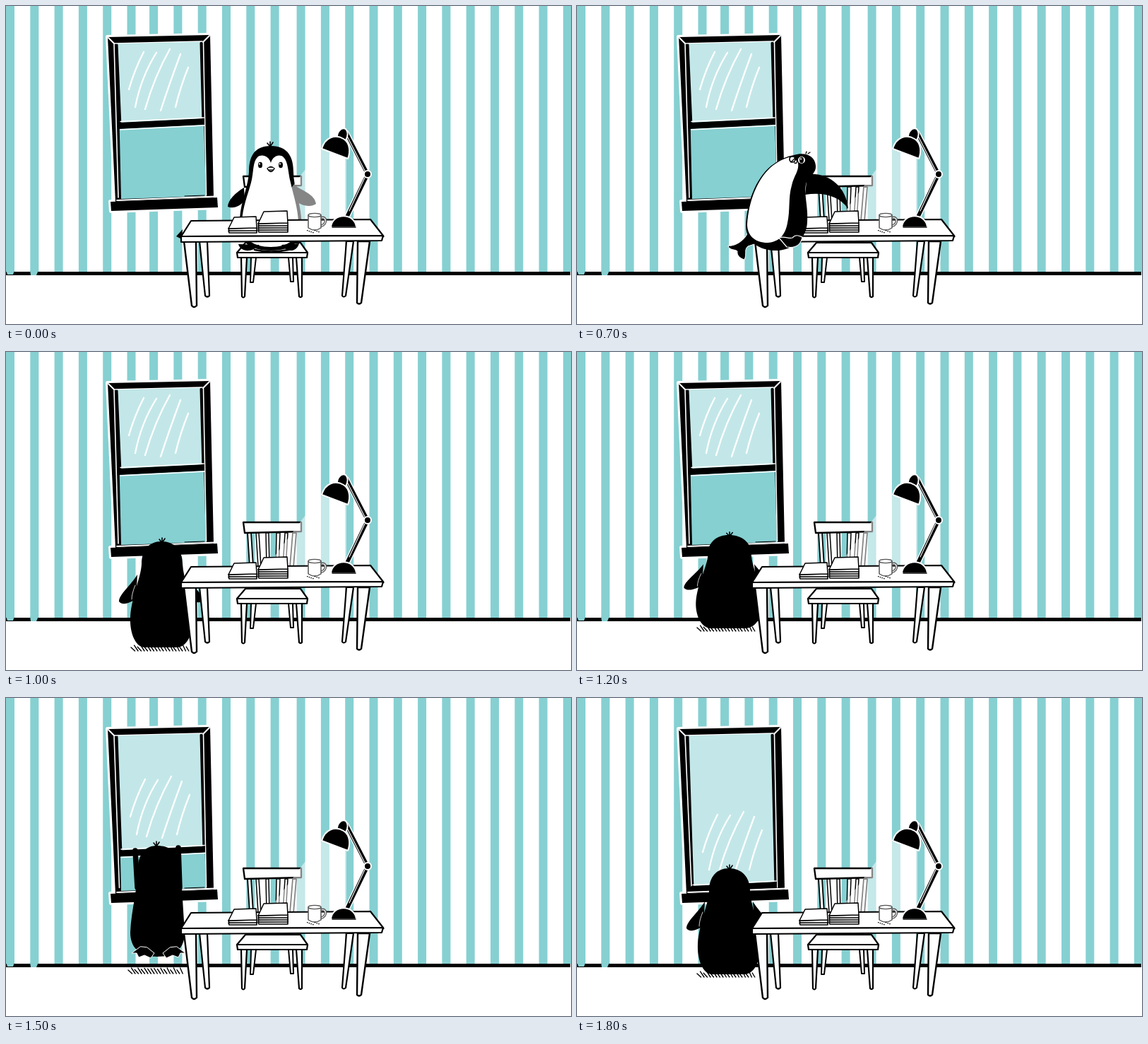
An HTML page with a canvas that plays this animation: 800x450 px, repeating every 2.3 s.

```html
<!DOCTYPE html>
<html lang="en">
<head>
<meta charset="utf-8">
<title>Penguin at the window</title>
<style>
html, body { margin: 0; width: 100%; height: 100%; overflow: hidden; background: #fff; }
canvas { display: block; width: 800px; height: 450px; }
</style>
</head>
<body>
<canvas id="stage" width="800" height="450"></canvas>
<script>
const ctx = document.getElementById('stage').getContext('2d');
const TEAL = '#86d0d2', GLASS = '#c3e7e8', INK = '#000', PAPER = '#fff';
const LOOP = 2300;
ctx.lineJoin = ctx.lineCap = 'round';

function shape(d, fill, stroke, width = 2) {
  const p = new Path2D(d);
  if (fill) { ctx.fillStyle = fill; ctx.fill(p); }
  if (stroke) { ctx.strokeStyle = stroke; ctx.lineWidth = width; ctx.stroke(p); }
}
const line = (d, width = 2, color = INK) => shape(d, null, color, width);
const box = (d, width = 2) => shape(d, PAPER, INK, width);

function oval(x, y, rx, ry, fill, stroke, width = 1.5) {
  ctx.beginPath();
  ctx.ellipse(x, y, rx, ry, 0, 0, Math.PI * 2);
  if (fill) { ctx.fillStyle = fill; ctx.fill(); }
  if (stroke) { ctx.strokeStyle = stroke; ctx.lineWidth = width; ctx.stroke(); }
}

// Draw with a shift, turn and stretch around a pivot.
function at(draw, { dx = 0, dy = 0, turn = 0, sx = 1, sy = 1, px = 0, py = 0 } = {}) {
  ctx.save();
  ctx.translate(px + dx, py + dy);
  ctx.rotate(turn);
  ctx.scale(sx, sy);
  ctx.translate(-px, -py);
  draw();
  ctx.restore();
}

function wall() {
  ctx.fillStyle = PAPER;
  ctx.fillRect(0, 0, 800, 450);
  ctx.fillStyle = INK;
  ctx.fillRect(0, 376, 799, 5);
  ctx.fillStyle = TEAL;
  for (let i = 0; i < 24; i++) {
    const x = i * 34.3 - (i > 5 && i < 12 ? 2.7 : 0);
    ctx.fillRect(x, 0, 12, 376);
  }
  shape('M0 374H12L10 380H2Z M34 374H46L43 381H35Z', TEAL);
}

// shut: 0 is open, 1 is closed
function windowPane(shut) {
  const drop = 101 * shut, y = 165 + drop;
  const frame = 'M144 44L289 41L294 271L155 277Z';
  const sill = 'M148 277L299 271L300 285L149 290Z';
  line(frame + sill, 6, PAPER);
  shape(frame, INK);
  shape('M158 53L277 50L283 269L163 273Z', TEAL);
  const lx = 162 + 2 * shut, rx = 281 + 2 * shut;
  shape(`M158 54L275 51L${rx} ${y - 5}L${lx} ${y}Z`, GLASS);
  line(`M156 55L${lx - 1} ${y + 5}`, 5);
  line(`M277 53L${rx - 1} ${y}`, 5);
  line(`M153 53L${159 + 3 * shut} ${y + 106 * (1 - shut)}`, 1.6, PAPER);
  line('M279.5 51L283.5 268', 1.6, PAPER);
  line('M154 53L278 50', 1.6, PAPER);
  shape(`M${lx - 2} ${y}L${rx} ${y - 6}V${y + 3}L${lx - 2} ${y + 9}Z`, INK);
  line(`M${lx} ${y - 1.5}L${rx - 1} ${y - 7}`, 1.5, PAPER);
  if (shut < 1) line(`M${lx} ${y + 10}L${rx} ${y + 4}`, 1.5, PAPER);
  line('M145 45L153 53M288 42L279 51', 2, PAPER);
  shape(sill, INK);
  line('M157 275L297 269.5', 1.8, PAPER);
  if (shut < 1) line('M253 269L281 268', 1);
  at(() => {
    line('M195 65Q182 90 174 118', 2.3, PAPER);
    line('M213 66Q191 101 183 143', 2.3, PAPER);
    line('M232 61Q210 100 197 146', 2.3, PAPER);
    line('M247 68Q231 111 219 148', 2.3, PAPER);
    line('M258 87Q247 114 240 143', 2.3, PAPER);
  }, { dx: 4 * shut, dy: 100 * shut });
}

function chair() {
  box('M342 256L345 304H350L347 256Z', 1.8);
  box('M354 256L357 304H361L358 256Z', 1.5);
  box('M368 256L369 304H373L372 256Z', 1.5);
  box('M383 256L382 304H386L388 256Z', 1.5);
  box('M395 256L392 304H396L399 256Z', 1.5);
  box('M406 256L402 304H407L411 256Z', 1.8);
  box('M336 241H418V254L338 256Z', 2.3);
  box('M347 356L346 391H350L354 356Z');
  box('M400 356L403 390H407L406 356Z');
  box('M333 356L334 411Q336 414 338 411L341 356Z', 2.2);
  box('M411 356L415 411Q417 413 419 411V356Z', 2.2);
  box('M339 335H417L427 349H327Z', 2.2);
  box('M327 349H427L426 356H328Z', 2.2);
}

function desk() {
  box('M274 333L282 410Q285 413 288 410L285 333Z', 2.2);
  box('M482 333L476 410Q478 413 481 410L492 333Z', 2.2);
  box('M252 333L263 424Q266 428 270 424L269 333Z', 2.4);
  box('M498 333L497 420Q500 423 503 420L515 333Z', 2.4);
  shape('M250 316L241 326L249 330Z M528 318L536 326L530 331Z', INK);
  box('M262 304L516 302L534 325L248 326Z', 2.2);
  box('M248 326L534 325L532 332L248 334Z', 2.2);
}

function books(x, y, w, h, n) {
  for (let i = n; i > 0; i--) {
    const b = y + h + i * 3;
    box(`M${x} ${b - 3}L${x + w} ${b - 4}V${b}L${x + 1} ${b}Z`, 1.6);
  }
  box(`M${x + 8} ${y + 1}L${x + w - 1} ${y}L${x + w} ${y + h - 1}L${x} ${y + h}Z`, 1.5);
}

function deskItems() {
  books(315, 298, 40, 17, 2);
  books(357, 290, 42, 18, 4);
  const gray = '#555';
  line('M446 300C454 297 455 309 446 311', 3.8, gray);
  line('M446 300C454 297 455 309 446 311', 1.2, PAPER);
  shape('M428 296V314Q437 320 446 314V296Z', PAPER, gray, 1.5);
  oval(437, 296, 9, 2.6, PAPER, gray, 1.3);
  ctx.fillStyle = INK;
  for (let i = 0; i < 7; i++) ctx.fillRect(426 + i * 2.7, 317 + i * 5 % 4, 1.5, 1.3);
}

function lampLight() {
  shape('M447 203L420 236L381 288V303H482V214Z', 'rgba(255,255,255,.52)');
}

function lamp() {
  line('M512 238L482 180M512 238L482 300', 8, PAPER);
  line('M512 238L482 180M512 238L482 300', 5.2);
  line('M509 235L484 186M508 243L486 290', 1.1, PAPER);
  oval(512, 238, 5, 5, INK, PAPER, 2);
  shape('M469 187C468 178 475 171 481 174C485 179 484 185 481 190Z', INK, PAPER, 2);
  shape('M447 202C452 185 467 181 478 188C487 194 488 206 484 216Z', INK, PAPER, 2);
  shape('M460 313C462 292 494 292 496 313Z', INK, PAPER, 2);
  line('M462 313H495', 1.5);
}

const tuft = (x, y) => line(`M${x} ${y}l-4 -5M${x} ${y}l0 -7M${x} ${y}l4 -6`, 1.6);

function eye(x, y) {
  oval(x, y, 3, 4.2, INK);
  oval(x - 1, y - 1.6, 1, 1.2, PAPER);
}

function beak(x, y) {
  shape(`M${x - 5} ${y}Q${x} ${y - 5} ${x + 5} ${y}Q${x} ${y + 9} ${x - 5} ${y}Z`, '#555', INK, 1.5);
  line(`M${x - 3} ${y}h6`, 2, PAPER);
}

function sitting() {
  shape('M337 257C325 264 314 275 314 284C322 288 333 282 338 275Z', INK);
  shape('M406 252C420 262 437 266 439 280C430 286 417 282 409 275Z', INK);
  shape('M375 198C350 198 344 215 344 235C343 255 333 275 331 300C328 330 340 346 375 346C410 346 422 330 418 300C416 275 407 255 407 235C407 215 400 198 375 198Z', INK);
  shape('M375 222C372 212 362 209 356 214C349 221 351 235 347 250C342 268 335 285 334 305C334 330 350 341 375 341C400 341 415 330 414 305C413 285 407 268 403 250C399 235 400 221 393 214C387 209 378 212 375 222Z', PAPER);
  shape('M329 337C332 348 348 350 359 338Z M390 338C398 350 412 348 415 336Z', INK);
  line('M352 345Q375 350 400 345', 2.5);
  tuft(374, 199);
  eye(360, 225);
  eye(389, 225);
  beak(375, 230);
}

function turned() {
  shape('M366 201C387 201 402 218 405 240C412 270 414 300 411 345H350L333 300C340 280 343 255 343 232C344 214 352 203 366 201Z', INK);
  shape('M368 223C365 213 351 213 347 224C345 250 338 280 334 302L338 342H384C388 305 392 270 389 243C390 226 378 214 368 223Z', PAPER);
  line('M346 236Q343 270 333 302', 1.4);
  shape('M317 335C320 345 336 345 342 336Z', INK);
  box('M340 335C343 347 363 350 382 342L388 334Z', 1.5);
  shape('M357 343C364 346 371 348 373 342C379 347 382 346 386 346C381 360 361 360 357 343Z', INK, PAPER, 1.2);
  tuft(365, 204);
  eye(352, 227);
  eye(374, 230);
  beak(360, 235);
}

function restingArm() {
  const g = ctx.createLinearGradient(387, 268, 402, 288);
  g.addColorStop(0, '#ddd');
  g.addColorStop(.5, '#777');
  g.addColorStop(1, '#111');
  shape('M412 255C395 264 377 285 372 304C374 313 382 312 387 307C399 296 411 280 412 255Z', g);
}

function leaping() {
  shape('M241 322C238 331 223 341 214 339C215 346 224 344 227 347C226 353 231 357 237 359C241 351 236 345 242 340L260 334Z', INK, PAPER, 1);
  shape('M307 211C323 206 337 212 338 226C339 235 331 240 325 249C320 264 328 284 326 306C325 327 310 343 286 346C258 347 240 334 239 312C240 280 252 245 275 226Q292 213 307 211Z', INK);
  shape('M300 214C306 219 311 215 313 222C315 233 307 240 304 254C299 270 302 290 298 307C295 324 286 334 270 335C252 335 241 325 241 309C243 277 255 244 277 226Q289 217 300 214Z', PAPER);
  shape('M326 238C355 235 381 254 384 287C371 269 350 263 323 267Z', INK);
  shape('M286 328C294 325 300 330 305 328C310 322 316 326 319 327C317 338 309 343 297 341Z', INK, PAPER, 1.2);
  oval(305, 217, 4, 4, PAPER, INK, 1.7);
  line('M303 221L309 215M308 222Q313 224 311 217', 1.4);
  oval(318, 218, 5, 5, PAPER);
  eye(318, 218);
  line('M324 209l1 -3M327 209l3 -2', 1.3);
}

// Base pose stands with its feet at (220, 418).
function standing() {
  shape('M186 315C177 330 160 343 160 353C165 360 178 354 184 349Z M254 315C263 330 279 343 279 351C276 357 262 354 256 349Z', INK);
  shape('M220 268C203 268 192 280 192 300C191 320 178 345 176 375C175 397 183 418 197 418H243C258 416 265 397 264 375C262 345 251 320 250 300C250 280 238 268 220 268Z', INK);
  line('M183 330Q178 342 178 350', .8, PAPER);
  tuft(221, 270);
}

const foot = 'M190 300L178 309L185 309L188 315L196 312L205 316L210 309L200 301Z';

function hanging() {
  line('M183 164L186 216M244 160L246 216', 7.5);
  shape('M214 157C200 157 189 165 187 185C187 215 177 250 176 280C176 302 190 314 214 314C240 314 253 302 253 280C251 250 249 215 247 185C245 165 230 157 214 157Z', INK);
  shape(foot, INK, PAPER, 1);
  at(() => shape(foot, INK, PAPER, 1), { sx: -1, px: 216 });
  tuft(213, 158);
}

function crouching() {
  line('M189 262L188 286M239 262L240 286', 7.5);
  shape('M149 358L162 356L174 374L160 375L157 366Z M261 352L273 362L268 367L260 369Z', INK, PAPER, 1);
  shape('M213 255C199 255 190 265 189 279C188 300 164 325 163 355C162 376 180 384 213 384C243 384 263 376 262 355C260 325 245 300 243 279C241 264 229 255 213 255Z', INK);
  line('M211 256v-3M214 256v-3M217 256v-3', 1.4);
}

function hatch(x, y, w) {
  for (let i = 0; i <= w; i += 4.6) {
    const lean = 5.5 - 2 * i / w, rise = 2 + 3 * Math.abs(Math.sin(i));
    line(`M${x + i} ${y + 4 - rise}l${lean} ${rise + 3}`, 1.4);
  }
}

const stand = (dx, dy, sx = 1, sy = 1, turn = 0) =>
  at(standing, { dx, dy, sx, sy, turn, px: 220, py: 418 });

// One entry per pose: behind the desk, in front of it, window position.
const poses = [
  { back: sitting },
  { back: turned, front: restingArm },
  { back: () => at(turned, { dx: -18, dy: -6, turn: -.22, px: 370, py: 330 }) },
  { front: leaping },
  { front: () => stand(6, -14, .98, .98, -.16) },
  { back: () => { hatch(177, 432, 82); stand(0, 18, 1.06, .9); } },
  { back: () => { hatch(177, 416, 82); stand(0, 0); } },
  { back: () => { hatch(174, 401, 82); stand(-3, -14); } },
  { back: () => { hatch(170, 388, 82); stand(-5, -27, 1.06, .88); } },
  { back: () => { hatch(177, 383, 76); at(hanging, { dy: 38 }); } },
  { back: () => { hatch(177, 383, 76); hanging(); } },
  { back: () => { hatch(173, 383, 78); at(hanging, { dy: 52 }); }, shut: .5 },
  { back: () => { hatch(165, 383, 90); crouching(); }, shut: 1 },
  { back: () => { hatch(168, 386, 85); stand(-6, -30, 1.04, .94); }, shut: 1 },
  { back: () => { hatch(170, 388, 82); stand(-5, -27); }, shut: 1 }
];

function draw(t) {
  const step = t < 500 ? 0 : Math.min(14, Math.floor((t - 500) / 100) + 1);
  const { back, front, shut = 0 } = poses[step];
  wall();
  windowPane(shut);
  chair();
  if (back) back();
  lampLight();
  desk();
  deskItems();
  lamp();
  if (front) front();
}

const start = performance.now();
function tick() {
  draw((performance.now() - start) % LOOP);
  requestAnimationFrame(tick);
}
tick();
</script>
</body>
</html>
```
